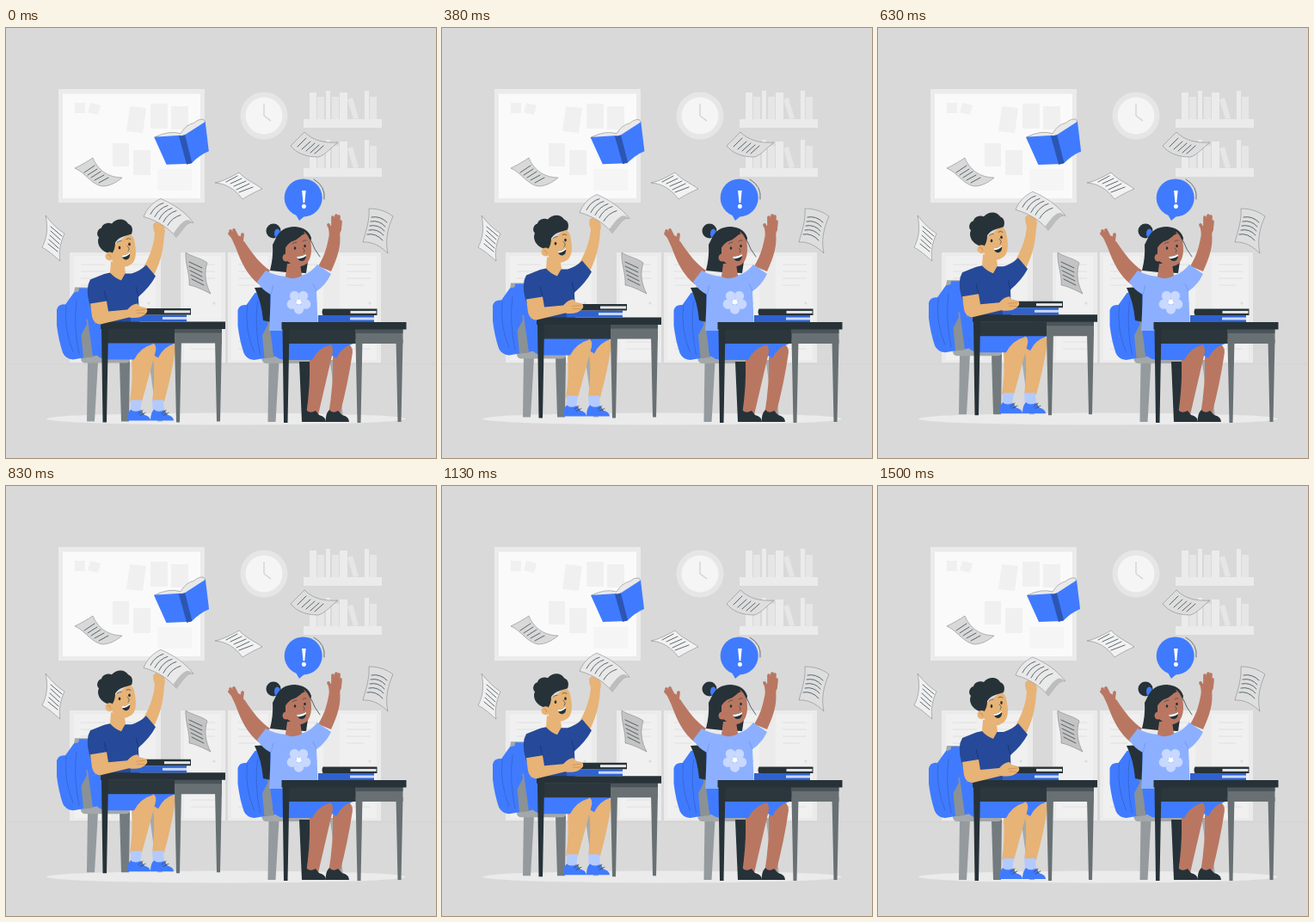
An HTML page for the animation above (1540 ms loop, 500 px wide and 500 px high).

```html
<!DOCTYPE html>
<html lang="en">
<head>
<meta charset="utf-8">
<title>Classroom</title>
<style>
html, body { margin: 0; height: 100%; overflow: hidden; background: #d9d9d9 }
svg { display: block; width: 100vw; height: 100vh }
.rim { fill: #ebebeb }
.pane { fill: #f0f0f0 }
.blue { fill: #407bff }
.navy { fill: #264a99 }
.dark { fill: #263238 }
.sky { fill: #8cb0ff }
.tan { fill: #e7b376 }
.brown { fill: #b97762 }
.line { fill: none; stroke: #37474f; stroke-width: .8; stroke-linecap: round; stroke-linejoin: round }
.paper { fill: #e9e9e9; stroke: #777; stroke-width: .5; stroke-linejoin: round }
.fold { fill: none; stroke: #3363cc; stroke-width: .8; stroke-linecap: round }
.fingers { fill: none; stroke: #b97762; stroke-width: 3.7; stroke-linecap: round; stroke-linejoin: round }
</style>
</head>
<body>
<svg viewBox="0 0 500 500">
<defs>
  <g id="shelf">
    <path class="rim" d="M346 106h91v10h-91z"/>
    <path class="rim" d="M353 75h8v31h-8zM372 73h5v33h-5zM388 75h9v31h-9zM417 73h5v33h-5z"/>
    <path fill="#e6e6e6" d="M362 80h8v26h-8zM379 80h8v26h-8zM397 83l6-2 7 24-6 1zM423 80h8v26h-8z"/>
  </g>
  <g id="door">
    <path class="pane" d="M0 0h43v121H0z"/>
    <path d="M8 10h28M8 18h28M8 26h28M8 34h20M8 100h28M8 108h28" stroke="#e0e0e0" fill="none"/>
    <circle cx="35" cy="55" r="1.6" fill="#dcdcdc"/>
  </g>
  <g id="chair">
    <path fill="#a3a9ab" d="M166 386h8l8 72h-6z"/>
    <path fill="#737b7f" d="M132 388h12l-1 70h-9z"/>
    <path fill="#949a9d" d="M95 388h12l-4 70h-9z"/>
    <path fill="#a3a8aa" d="M87 381h57q2 9-5 9H91q-5-1-4-9z"/>
  </g>
  <g id="pack">
    <path class="blue" d="M79 308L99 304L108 381L78 386Q69 385 66 378Q61 363 59 346L59 328Q61 321 69 322Z"/>
    <path fill="#8b9295" d="M86 341l9-2 6 44-11 1z"/>
    <path class="blue" d="M85 303h10q-5 18-1 42l-11 21q-2-38 2-63z"/>
    <path class="fold" d="M70 323q-3 28 8 54M82 318q-4 28 3 62"/>
  </g>
  <g id="hips">
    <path class="blue" d="M104 342h10l6 22h48l3 4q-15 4-22 18H118q-14-1-15-12z"/>
  </g>
  <path id="thigh" class="blue" d="M160 362h37v5q-14 4-20 17l-10-6z"/>
  <g id="desk">
    <path fill="#2c373d" d="M112 350h85v17h-85z"/>
    <path fill="#687073" d="M196 350h55v17h-55z"/>
    <path fill="#4a5459" d="M196 350h55v5h-55z"/>
    <path fill="#687073" d="M196 362h8l-2 97h-4zM243 362h8l-2 96h-4z"/>
    <path class="dark" d="M111 350h8l-2 109h-4.500zM110 342h145v8.500H110z"/>
  </g>
  <g id="books">
    <path fill="#2f62d0" d="M0 8h65v8H0z"/>
    <path fill="#c8d8ff" d="M37 10.500h28v3H37z"/>
  </g>
  <g id="tome">
    <path class="dark" d="M2 0h63v7.500H2q-2-4 0-7.500z"/>
    <path fill="#e6e6e6" d="M34 2.400h30v3H34z"/>
  </g>
  <circle id="petal" cx="340.500" cy="310" r="5.700" fill="#c8d8ff"/>
</defs>

<path d="M0 391h500" stroke="#d3d3d3"/>

<path class="rim" d="M61 71h170v132H61z"/>
<path fill="#fafafa" d="M66 76.500h160V198H66z"/>
<path fill="#f0f0f0" d="M80 87h12v12H80zM98 87l12 3-3 11-12-3zM144 91l19 2-4 29-19-2zM168 88h20v29h-20zM192 91h20v27h-20zM124 134h19v27h-19zM148 142h20v29h-20z"/>
<path fill="#f5f5f5" d="M176 164h40v25h-40z"/>

<circle cx="300" cy="102" r="27.500" fill="#e6e6e6"/>
<circle cx="300" cy="102" r="21.500" fill="#f5f5f5"/>
<path d="M300 88v14l8 6" fill="none" stroke="#d2d2d2" stroke-width="1.300"/>
<use href="#shelf"/><use href="#shelf" y="57"/>

<path class="rim" d="M74 261h106v128H74zM203 261h52v128h-52zM258 261h178v128H258z"/>
<use href="#door" x="79" y="265"/><use href="#door" x="131" y="265"/>
<use href="#door" x="207" y="265"/><use href="#door" x="262" y="265"/>
<use href="#door" x="326" y="265"/><use href="#door" x="388" y="265"/>

<ellipse cx="256" cy="454.500" rx="209" ry="7" fill="#ebebeb"/>

<!-- loose sheets -->
<path class="paper" style="fill:#d9d9d9" d="M80 163C88 159 95 155 101 151C106 164 118 174 135 174C128 180 120 184 112 184C99 182 92 168 80 163Z"/>
<path class="line" d="M91 168L103 160M95 171L106 164M99 174L110 167M103 177L114 171M108 180L119 174"/>
<path class="paper" style="fill:#f2f2f2" d="M243 180C253 178 262 173 271 168C278 176 288 180 298 187C291 190 283 194 275 199C266 187 256 181 243 180Z"/>
<path class="line" d="M256 179L269 172M261 181L274 175M265 184L279 178M268 188L283 181M271 191L287 185"/>
<path class="paper" style="fill:#dedede" d="M347 121C357 131 370 134 386 133C378 139 371 148 363 150C350 150 338 146 331 137C337 131 342 126 347 121Z"/>
<path class="line" d="M339 138L349 128M344 141L354 132M349 143L359 134M354 145L364 136M359 146L369 137"/>
<path class="paper" style="fill:#f0f0f0" d="M46 218C52 226 60 234 68 239C63 250 61 261 63 271C57 266 50 259 42 255C48 244 49 231 46 218Z"/>
<path class="line" d="M52 231L65 242M52 236L63 246M51 241L62 251M50 246L61 256M49 251L60 260"/>
<path class="paper" style="fill:#c4c4c4" d="M209 261C216 266 226 267 234 273C230 285 232 298 238 309C230 305 220 300 213 299C214 286 208 274 209 261Z"/>
<path class="line" d="M213 272L228 279M213 277L228 284M214 282L228 289M215 287L229 294M216 292L230 299"/>
<path class="paper" style="fill:#dedede" d="M422 210C431 210 441 212 450 219C443 234 441 249 444 262C437 255 427 248 415 249C419 235 423 223 422 210Z"/>
<path class="line" d="M425 220Q435 218 443 226M424 225Q434 223 441 231M423 230Q433 228 440 236M422 235Q432 233 439 241M420 240Q430 238 438 247"/>

<!-- flying book -->
<g id="book">
  <path class="paper" d="M174 127Q190 119 203 123Q209 113 218 111Q224 106 229 107L231 110L208 130Z"/>
  <path class="blue" d="M173 127L203 125L215 157L187 158ZM207 125L231 109.500L235 143Q225 147 215 157Z"/>
  <path fill="#2b56b3" d="M201 126L208 124.500L216 156L210 158Z"/>
</g>

<!-- speech bubble -->
<path class="blue" d="M337 217L341 224L348 218Z"/>
<circle class="blue" cx="345.700" cy="197.400" r="22"/>
<path class="line" style="stroke-width:.7" d="M358 176Q372 184 370 199"/>
<text x="346.500" y="210" font-family="'Liberation Serif', serif" font-weight="700" font-size="31" fill="#fff" text-anchor="middle">!</text>

<!-- girl -->
<g>
  <use href="#chair" x="210.500"/>
  <use href="#pack" x="210.500"/>
  <path class="dark" d="M289 302L307 301L308 342L299 340Q297 318 289 302Z"/>
  <path class="dark" d="M341 388h12v70h-9z"/>
  <path class="brown" d="M380 384Q382 370 392 367Q403 366 403 377Q398 412 388 450H375Q381 413 380 384Z"/>
  <use href="#thigh" x="207"/>
  <path class="brown" d="M353 386Q360 370 370 366Q381 366 380 377Q372 411 363 450H349Q354 416 353 386Z"/>
  <use href="#hips" x="207"/>
  <path class="dark" d="M345 458q-1-9 4-14 4 5 11 1l4 5q8 2 8 8zM372 458q-1-9 4-14 4 5 10 1l5 5q8 2 8 8z"/>
  <circle class="dark" cx="311" cy="236" r="8.500"/>
  <ellipse class="blue" cx="315.500" cy="239" rx="3.500" ry="5.500"/>
  <path class="dark" d="M313 246Q319 231 336 231Q351 232 355 244L349 285Q328 285 307 282Q311 266 310 252Z"/>
  <path class="line" d="M355 248Q358 257 365 266"/>
  <path class="brown" d="M267 255L277 248C288 265 296 274 307 282L294 298C281 288 273 272 267 255Z"/>
  <path class="brown" d="M376 239L388 238C390 252 386 266 378 283L363 277C371 264 374 252 376 239Z"/>
  <path class="brown" d="M262 244Q268 238 275 244L277 250Q271 258 267 255ZM375 232Q382 225 390 231L388 241L376 242Z"/>
  <path class="fingers" d="M267 247L260 239M268 246L261 236M270 245L265 235M274 249L275 240M378 235L375 229M380 233L380 220M383 232L384 218M386 233L387 219M388 235L389 225"/>
  <path class="sky" d="M302 282Q312 288 326 289L346 287Q355 284 362 275L378 286Q371 300 361 306L363 352H306L308 310Q298 305 292 295Z"/>
  <path d="M308 310l3-11M361 306l-4-9" fill="none" stroke="#6f95e8" stroke-width=".8"/>
  <path class="brown" d="M327 274h15l2 14q-9 6-19 1z"/>
  <path class="brown" d="M325 250Q340 248 347 237Q356 245 355 259Q354 275 343 277Q332 278 325 268Z"/>
  <path class="dark" d="M323 258Q330 246 348 239L336 232L318 240Z"/>
  <circle class="brown" cx="326" cy="267" r="4.500"/>
  <ellipse class="dark" cx="336" cy="256" rx="1.300" ry="1.800"/>
  <ellipse class="dark" cx="347.500" cy="253.500" rx="1.300" ry="1.800"/>
  <path class="line" d="M333 251q2-2 5-2M345 248q2-2 4-1M345 256q4 3 1 5" style="stroke-width:.7"/>
  <path class="dark" d="M338 266q6 0 11-3 0 8-5 8-4 0-6-5z"/>
  <path fill="#fff" d="M338 266q6 0 11-3v2q-5 4-10 3z"/>
  <g>
    <use href="#petal" transform="rotate(36 340.500 318.500)"/>
    <use href="#petal" transform="rotate(108 340.500 318.500)"/>
    <use href="#petal" transform="rotate(180 340.500 318.500)"/>
    <use href="#petal" transform="rotate(252 340.500 318.500)"/>
    <use href="#petal" transform="rotate(324 340.500 318.500)"/>
  </g>
  <circle cx="340.500" cy="318.500" r="3" fill="#fff"/>
  <use href="#desk" x="210.500"/>
  <use href="#books" x="363" y="326"/><use href="#tome" x="366.500" y="326.500"/>
</g>

<!-- boy -->
<g id="boy">
  <use href="#chair"/>
  <path fill="#a3a8aa" d="M80 302h20l8 50-12 2-20-24z"/>
  <use href="#pack"/>
  <path class="tan" d="M171 384Q174 370 184 367Q197 364 197 374Q193 402 184 435H170Q174 406 171 384Z"/>
  <use href="#thigh"/>
  <path class="tan" d="M146 386Q154 370 164 366Q176 365 174 376Q166 406 158 435H144Q148 410 146 386Z"/>
  <use href="#hips"/>
  <path fill="#b3caff" d="M145 433h13l-2 14h-11zM170 433h13l1 14h-13z"/>
  <path class="blue" d="M141 457q0-9 4-13 4 4 11 1l4 5q8 2 8 7zM168 457q0-9 4-13 4 4 11 1l4 5q8 2 8 7z"/>
  <path class="line" d="M154 449l5-4M156 451l6-3M157 445l3 5M181 449l5-4M183 451l6-3M184 445l3 5"/>
  <path class="tan" d="M157 283C166 270 172 254 173 239Q169 231 174 226L183 230Q186 235 184 241C183 260 179 275 170 292Z"/>
  <path class="navy" d="M108 289Q114 286 121 285Q131 291 138 286L146 286Q156 283 163 276L174 289Q167 302 154 313L155 343H104L97 321Q92 303 98 293Z"/>
  <path d="M117 318l-3-12M154 313l-3-12" fill="none" stroke="#1b3670" stroke-width=".9"/>
  <path class="tan" d="M122 272h15l2 13-5 9q-8-3-13-9z"/>
  <path class="tan" d="M121 254Q133 250 142 239Q149 241 150 252Q153 269 146 275Q138 281 130 277Q120 272 121 254Z"/>
  <path class="dark" d="M118 262C109 259 105 250 108 244C104 240 107 234 111 233C112 228 119 226 123 228C128 222 138 221 142 228C147 230 148 235 146 240C140 242 131 243 127 250Q127 258 123 263Z"/>
  <circle class="tan" cx="120.500" cy="266" r="5"/>
  <path d="M118 264q4 0 4 4" fill="none" stroke="#c98d50" stroke-width=".8"/>
  <ellipse class="dark" cx="132" cy="256" rx="1.300" ry="1.900"/>
  <ellipse class="dark" cx="143.500" cy="252" rx="1.300" ry="1.900"/>
  <path class="line" d="M129 250q2-2 5-2M140 246q2-2 5 0M141 254q4 3 1 6" style="stroke-width:.7"/>
  <path class="dark" d="M134 265q6 0 10-4 1 8-4 9-4 0-6-5z"/>
  <path fill="#fff" d="M134 265q6 0 10-4v2q-4 4-9 4z"/>
  <path class="paper" d="M160 220C164 210 171 203 180 199C194 205 208 214 218 227C211 225 207 233 198 244C190 234 178 225 160 220Z"/>
  <path fill="#bdbdbd" d="M218 227C211 225 207 233 198 244L194 240C201 231 207 222 213 224Z"/>
  <path class="line" d="M168 217Q173 207 183 204M173 220Q178 210 188 207M178 223Q183 213 193 210M183 226Q188 216 198 213M188 230Q193 221 203 218"/>
  <path class="tan" d="M171 229q3-4 6-1l7 5q1 3-3 3l-8 1z"/>
  <use href="#desk"/>
  <use href="#books" x="145" y="326"/><use href="#tome" x="150" y="326.500"/>
  <path class="tan" d="M98 321L117 318L119 330L141 328Q147 321 153 321L155 324L163 326Q166 330 162 333Q156 339 143 337L110 345Q102 345 100 336Z"/>
  <path d="M151 329l11-1M152 332l9 0" fill="none" stroke="#c98d50" stroke-width=".7"/>
</g>
</svg>
<script>
const PERIOD = 1540, LEAD = 40;
const boy = document.getElementById('boy');
const book = document.getElementById('book');
const beats = [[0, 1], [.1, 1.1], [.3, 1], [.4, 1], [.5, 1.1], [.6, 1], [1, 1]];

function beat(p) {
  const i = beats.findIndex(([at]) => at > p);
  const [t0, a] = beats[i - 1], [t1, b] = beats[i];
  return a + (b - a) * (p - t0) / (t1 - t0);
}

function draw() {
  const p = (performance.now() + LEAD) / PERIOD % 1;
  const lift = 10 * (1 - Math.abs(2 * p - 1));
  boy.setAttribute('transform', `translate(0 ${-lift})`);
  book.setAttribute('transform', `translate(204 132.5) scale(${beat(p)}) translate(-204 -132.5)`);
  requestAnimationFrame(draw);
}
draw();
</script>
</body>
</html>
```
